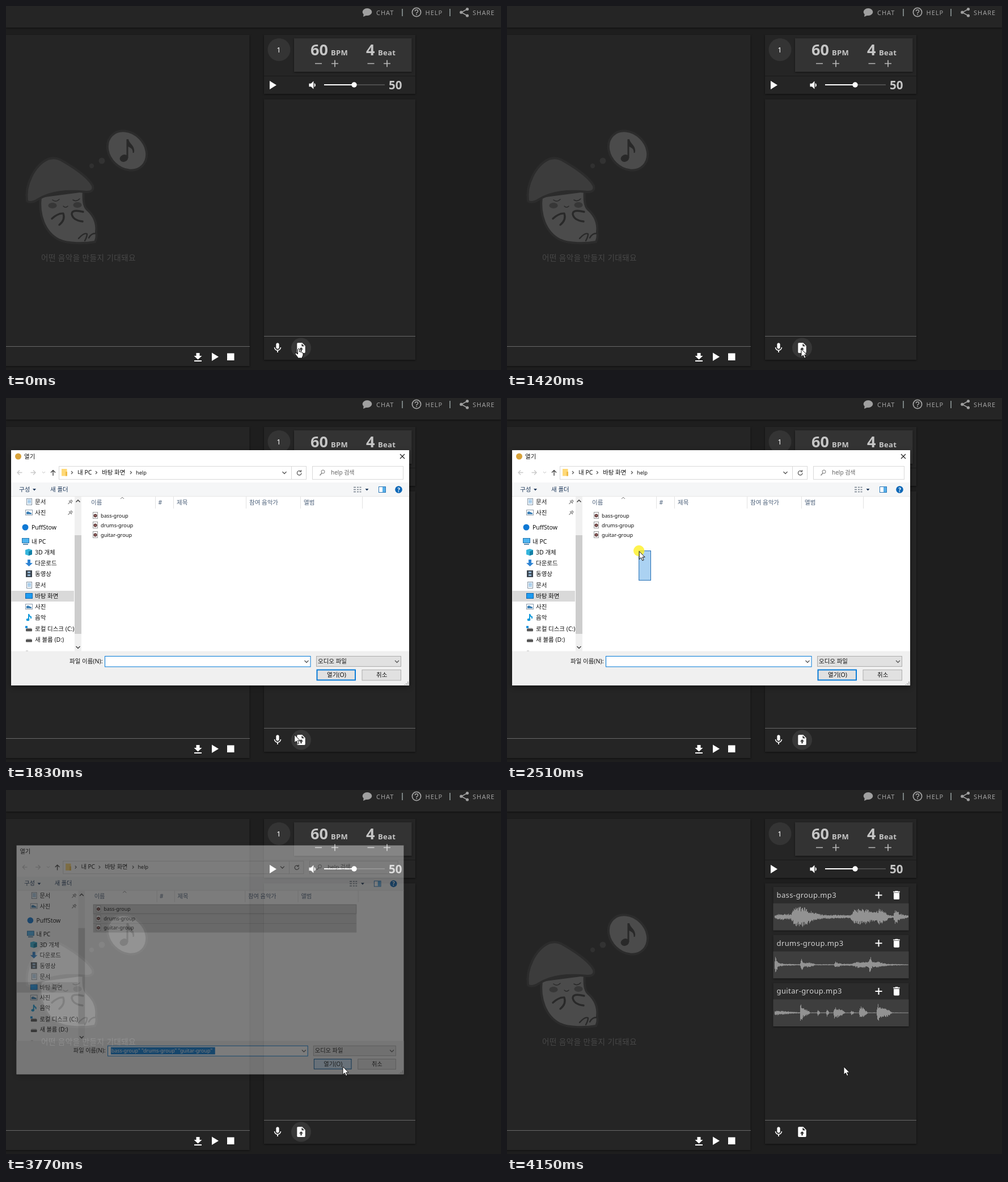
These frames come from a looping animation (873x642 px, 6150 ms). An HTML page:

```html
<!DOCTYPE html>
<html lang="ko">
<head>
<meta charset="utf-8">
<title>Import audio</title>
<style>
html, body { margin: 0; width: 100%; height: 100%; overflow: hidden; background: #1e1e1e; }
svg { display: block; width: 873px; height: 642px; }
text { font-family: "Noto Sans", "Noto Sans CJK KR", "Noto Sans CJK", sans-serif; white-space: pre; }
.panel { filter: drop-shadow(0 1px 1.5px rgba(0,0,0,.55)); }
.win { filter: drop-shadow(0 3px 5px rgba(0,0,0,.4)); }
</style>
</head>
<body>
<svg id="stage" viewBox="0 0 873 642"></svg>
<script>
const LOOP = 6150;
const rect = (x, y, w, h, fill, more = '') =>
  `<rect x="${x}" y="${y}" width="${w}" height="${h}" fill="${fill}" ${more}/>`;
const frame = (x, y, w, h, fill, edge, more = '') =>
  rect(x + .5, y + .5, w - 1, h - 1, fill, `stroke="${edge}" ${more}`);
const text = (x, y, size, str, fill, more = '') =>
  `<text x="${x}" y="${y}" font-size="${size}" fill="${fill}" ${more}>${str}</text>`;
const path = (d, fill, more = '') => `<path d="${d}" fill="${fill}" ${more}/>`;
const line = (d, color, w = 1, more = '') =>
  path(d, 'none', `stroke="${color}" stroke-width="${w}" ${more}`);
const dot = (x, y, r, fill, more = '') => `<circle cx="${x}" cy="${y}" r="${r}" fill="${fill}" ${more}/>`;
const oval = (x, y, rx, ry, fill, more = '') =>
  `<ellipse cx="${x}" cy="${y}" rx="${rx}" ry="${ry}" fill="${fill}" ${more}/>`;
const group = (body, more = '') => `<g ${more}>${body}</g>`;
const icon = (cx, cy, s, d, fill = '#fff') =>
  path(d, fill, `transform="translate(${cx - 12 * s} ${cy - 12 * s}) scale(${s})"`);
const plus = (x, y, r, color, w) => line(`M${x - r} ${y}h${2 * r}M${x} ${y - r}v${2 * r}`, color, w);
const ROUND = 'stroke-linecap="round" stroke-linejoin="round"';

// ---- application page ----

function mascot() {
  const dark = '#292929', edge = `stroke="#2c2c2c" stroke-width="4" ${ROUND}`;
  const pen = (d, w = 3) => line(d, dark, w, ROUND);
  return path('M61 336C57 368 68 399 93 412C110 420 140 419 157 416Q161 408 159 399Q162 375 142 358Q135 350 137 326Z', '#4b4b4b', edge)
    + path('M37 344C33 315 50 281 74 270Q87 265 101 274C125 288 145 302 153 317Q156 328 142 328C108 325 78 327 55 342Q43 349 37 344Z', '#3c3c3c', edge)
    + pen('M82 342Q88 347 94 341M118 342Q124 346 130 340M101 353Q105 357 109 353', 1.6)
    + oval(82, 352, 7.5, 5, '#373737') + oval(126, 351, 7.5, 5, '#373737')
    + pen('M81 375Q92 365 101 366Q105 377 94 386M136 363Q116 358 116 367Q118 378 135 380', 3.4)
    + pen('M128 410Q138 399 143 402Q143 407 139 414M146 409Q150 401 158 401', 2.4)
    + dot(151, 282, 4.2, '#303030') + dot(169, 273, 5.5, '#323232')
    + oval(213.5, 255, 38, 31, '#4b4b4b', `transform="rotate(45 213.5 255)" ${edge}`)
    + oval(208, 268.5, 7.5, 6.2, dark, 'transform="rotate(-20 208 268.5)"')
    + path('M212.5 268V235H216C217 243 229 247 225.5 259H223.5C224 251 219 250 215.5 248V268Z', dark)
    + text(62, 449, 13.5, '어떤 음악을 만들지 기대돼요', '#484848', 'letter-spacing=".5" font-weight="300"');
}

function header() {
  const c = '#a0a0a0';
  const label = (x, s) => text(x, 16, 11, s, c, 'letter-spacing="1" font-weight="500"');
  return rect(0, 0, 873, 38, '#252525', 'class="panel"')
    + oval(637, 10.5, 8.3, 6.5, c) + path('M631 13l-1 6 7-3z', c) + label(653, 'CHAT')
    + line('M699 5v13M783 5v13', '#8f9a9a', 1.6)
    + dot(724, 11, 7.6, 'none', `stroke="${c}" stroke-width="1.8"`)
    + line('M721.3 9.3Q721.5 6.8 724 6.8T726.6 9.3Q726.6 10.5 724 12.2V13', c, 1.6)
    + rect(723.2, 14, 1.7, 1.7, c) + label(739.5, 'HELP')
    + line('M813.5 5.5L803 11.2L813.5 17', c, 1.6)
    + dot(813.5, 5.5, 2.6, c) + dot(802.8, 11.2, 2.6, c) + dot(813.5, 17, 2.6, c) + label(823, 'SHARE');
}

const MIC = 'M12 14c1.7 0 3-1.3 3-3V5c0-1.7-1.3-3-3-3S9 3.3 9 5v6c0 1.7 1.3 3 3 3zM17.3 11c0 3-2.5 5.1-5.3 5.1S6.7 14 6.7 11H5c0 3.4 2.7 6.2 6 6.7V21h2v-3.3c3.3-.5 6-3.3 6-6.7z';
const UPLOAD = 'M14 2H6C4.9 2 4 2.9 4 4v16c0 1.1.9 2 2 2h12c1.1 0 2-.9 2-2V8zM13 9V3.5L18.5 9zM12 11l4 4h-2.7v4h-2.6v-4H8z';
const SPEAKER = 'M17 12c0-1.8-1-3.3-2.5-4v8c1.5-.7 2.5-2.2 2.5-4zM4 9v6h4l5 5V4L8 9z';
const BIN = 'M6 19c0 1.1.9 2 2 2h8c1.1 0 2-.9 2-2V7H6zM19 4h-3.5l-1-1h-5l-1 1H5v2h14z';

function page() {
  const c = '#c6c6c6', sign = '#b8b8b8';
  return rect(0, 0, 873, 642, '#1e1e1e') + header()
    + rect(-4, 51, 433.5, 584, '#252525', 'class="panel"') + mascot()
    + line('M0 600.5H430M455 582.5H722', '#686868')
    + path('M335.5 612h6v5h4l-7 6.5-7-6.5h4zM332 625h13v2h-13z', '#fff')
    + path('M363 611.5V626L375 618.8z', '#fff') + rect(390, 612.5, 12.5, 12.5, '#fff')
    + rect(455, 51, 267, 104, '#252525', 'class="panel"')
    + line('M455 123.5H722', '#1c1c1c', 1.5)
    + dot(481.5, 77, 20, '#343434') + text(477.3, 82, 13, '1', '#fff')
    + rect(508, 57, 207.5, 59, '#333', 'class="panel"')
    + text(537, 86.5, 27, '60', c, 'font-weight="700"') + text(573, 86.5, 13, 'BPM', c, 'font-weight="600" letter-spacing=".3"')
    + text(635, 86.5, 27, '4', c, 'font-weight="700"') + text(656, 86.5, 13, 'Beat', c, 'font-weight="600" letter-spacing=".3"')
    + line('M545 101.5h12M637.5 101.5h12', sign, 1.7) + plus(580, 101.5, 6, sign, 1.7) + plus(672, 101.5, 6, sign, 1.7)
    + path('M465 132V147L477 139.5z', '#fff') + icon(541.5, 139.5, .88, SPEAKER)
    + line('M614 139H668', '#5a5a5a', 1.6) + line('M561 139H614', '#fff', 2) + dot(614, 139, 4.7, '#fff')
    + text(675, 146.5, 20.5, '50', c, 'font-weight="700"')
    + rect(455, 164.5, 267, 459.5, '#252525', 'class="panel"')
    + line('M455 582.5H722', '#686868')
    + dot(520.5, 603, 17.5, '#373737', 'id="hover"') + dot(520.5, 603, 17.5, '#fff', 'id="ripple"')
    + icon(479, 603, .88, MIC) + icon(520.5, 603, .9, UPLOAD);
}

// ---- audio cards ----

const envelopes = [
  [0,3, 14,6, 30,5, 38,18, 55,18, 68,9, 85,4, 135,3, 142,13, 160,15, 179,8, 185,14, 195,12, 203,3, 211,2, 214,16, 222,6, 238,2],
  [0,2, 3,17, 8,4, 18,2, 46,1, 49,11, 55,3, 61,5, 75,1, 106,1, 109,6, 120,2, 138,2, 148,6, 167,5, 170,17, 174,5, 183,6, 200,2, 238,.6],
  [0,5, 30,2, 46,1, 47,18, 52,9, 62,4, 64,.7, 76,.7, 78,6, 82,.7, 92,.7, 94,7, 98,.7, 105,.7, 107,11, 121,5, 126,.7, 135,.7, 137,5, 142,.7, 150,.7, 153,13, 164,3, 166,.7, 181,.7, 183,17, 192,8, 200,8, 209,.7, 238,.5]
];

function amp(env, x) {
  let i = 0;
  while (i < env.length - 4 && x > env[i + 2]) i += 2;
  const [x0, a0, x1, a1] = env.slice(i, i + 4);
  return a0 + (a1 - a0) * (x - x0) / (x1 - x0);
}

function wave(env, cy, seed) {
  const noise = () => .5 + .5 * ((seed = seed * 16807 % 2147483647) / 2147483647);
  let d = '';
  for (let x = 2; x < 238; x++) {
    const a = amp(env, x), up = Math.max(.5, a * noise()), down = Math.max(.5, a * noise());
    d += `M${470.5 + x} ${(cy - up).toFixed(1)}v${(up + down).toFixed(1)}`;
  }
  return line(d, '#929292', 1.05);
}

const cards = ['bass', 'drums', 'guitar'].map((name, i) => {
  const y = 171 + i * 84.7;
  return group(rect(469.5, y, 239, 76.5, '#2c2c2c', 'class="panel"')
    + rect(469.5, y + 29, 239, 47.5, '#3e3e3e')
    + text(475.5, y + 19, 13, name + '-group.mp3', '#d2d2d2', 'letter-spacing=".4"')
    + plus(655.5, y + 14.5, 6, '#fff', 2) + icon(687, y + 14.5, .84, BIN)
    + group(wave(envelopes[i], y + 52.5, 77 + i * 31), `id="wave${i}"`), `id="card${i}"`);
}).join('');

// ---- file dialog ----

const art = {
  doc: (x, y) => frame(x + 2, y - 6, 10, 12, '#fff', '#8293a3') + line(`M${x + 4} ${y - 3}h6M${x + 4} ${y - .5}h6M${x + 4} ${y + 2}h6`, '#3f8fd0'),
  pic: (x, y) => frame(x, y - 5, 13, 10, '#fff', '#8a99a8') + path(`M${x + 2} ${y + 3}v-4l3-1 6 3v2z`, '#3b7fb5'),
  ball: (x, y) => dot(x + 6, y, 5.5, '#0f78d4'),
  pc: (x, y) => frame(x, y - 6, 13, 9, '#4db4f0', '#2374ad') + rect(x + 2, y + 4, 9, 2, '#5d8cb0'),
  cube: (x, y) => path(`M${x} ${y - 4}l6-2 6 2v8l-6 2-6-2z`, '#35b5dc') + path(`M${x + 6} ${y - 1}l6-3v8l-6 2z`, '#137fa5'),
  down: (x, y) => path(`M${x + 4} ${y - 6}h5v6h4l-6.500 6-6.500-6h4z`, '#2d83d2'),
  film: (x, y) => rect(x + 1, y - 6, 11, 12, '#3c4650') + rect(x + 4, y - 4, 5, 3, '#8fb3d0') + rect(x + 4, y + 1, 5, 3, '#8fb3d0'),
  desk: (x, y) => frame(x, y - 5, 13, 10, '#1e9bf0', '#0e65ad'),
  note: (x, y) => line(`M${x + 6} ${y + 4}v-10q1 4 4 5v3`, '#129bdc', 2) + oval(x + 4.500, y + 4, 2.800, 2.200, '#129bdc'),
  disk: (x, y) => rect(x + 1, y, 11, 4.5, '#555', 'rx="1"') + rect(x + 2, y - 1.5, 9, 1.5, '#b8b8b8'),
  sys: (x, y) => art.disk(x, y) + rect(x, y - 5, 4, 4, '#1e93dc')
};

const places = [
  [183, '문서', 'doc'], [202, '사진', 'pic'], [228, 'PuffStow', 'ball', 1], [253, '내 PC', 'pc', 1],
  [272, '3D 개체', 'cube'], [291, '다운로드', 'down'], [310, '동영상', 'film'], [330, '문서', 'doc'],
  [349, '바탕 화면', 'desk'], [368, '사진', 'pic'], [387, '음악', 'note'],
  [407, '로컬 디스크 (C:)', 'sys'], [426, '새 볼륨 (D:)', 'disk']
];

const ko = (x, y, s, fill = '#111') => text(x, y, 10.5, s, fill);
const en = (x, y, s, more = '') => text(x, y, 9.2, s, '#111', more);
const chevron = (x, y, c = '#555') => line(`M${x - 3.5} ${y - 2}l3.5 3.500 3.5-3.500`, c, 1.3);

function sidebar() {
  const pin = y => line(`M109.500 ${y + 4}l3.500-3.500M111 ${y - 2}l5 5M113 ${y - 1}l2-2 2 2-2 2`, '#8b8b8b', 1.3);
  return rect(9.5, 340, 110.5, 19, '#d9d9d9')
    + places.map(([y, s, kind, root]) => art[kind](root ? 28 : 34, y) + ko(root ? 45 : 51, y + 4, s)).join('')
    + pin(183) + pin(202) + rect(121, 174, 12, 273, '#f0f0f0') + rect(121, 242, 12, 174, '#cdcdcd')
    + line('M123.500 183.500l3.500-3.500 3.500 3.500M123.500 438l3.500 3.500 3.500-3.500', '#444', 1.5)
    + rect(35, 445.500, 4, 1, '#bbb');
}

function toolbar() {
  const nav = '#1e395b', sep = '#e2e2e2', arrow = x => line(`M${x} 129l2.500 2.500-2.500 2.500`, '#555', 1.2);
  return line('M28.500 131.500h-8.500m4-4l-4 4 4 4M43.500 131.500h8.500m-4-4l4 4-4 4', '#c9c9c9', 1.3)
    + line('M64 130l2.500 2.500 2.500-2.500', '#c0c0c0')
    + line('M83 137v-9.500m-4 4l4-4 4 4', '#444', 1.4)
    + frame(93, 120, 411, 24, '#fff', '#d9d9d9') + frame(503, 120, 27, 24, '#fff', '#d9d9d9')
    + frame(540, 120, 161, 24, '#fff', '#d9d9d9')
    + rect(98, 125, 9.500, 12.500, '#ffd977') + rect(105, 130, 3, 7.500, '#eebb48')
    + arrow(115) + ko(126, 135, '내 PC') + arrow(158) + ko(169, 135, '바탕 화면') + arrow(219) + en(229, 135, 'help')
    + chevron(491, 132)
    + line('M519.500 129.200a3.800 3.800 0 1 0 1.500 3M520.500 127v3h-3', '#555', 1.2)
    + dot(559, 130, 3, 'none', 'stroke="#777"') + line('M557 132.500l-3.500 4', '#777', 1.2)
    + text(573, 135, 10, 'help 검색', '#666')
    + rect(9.5, 149, 701, 25, '#f5f6f7') + line('M9 173.500H711', '#e8e8e8')
    + ko(23, 164.500, '구성', nav) + path('M47 160h6l-3 3.500z', nav) + ko(78, 164.500, '새 폴더', nav)
    + line('M613 157.500h4m2 0h3m1.500 0h3M613 161.500h4m2 0h3m1.500 0h3M613 165.500h4m2 0h3m1.500 0h3', '#75808c', 1.6)
    + path('M633.500 160h6l-3 3.500z', nav)
    + frame(657, 156, 13, 11, '#fff', '#2b77b8') + rect(664, 157, 5, 9, '#57aee8')
    + dot(692.500, 161.500, 6.300, '#0b67b7') + text(690.200, 165.500, 10, '?', '#fff', 'font-weight="700"')
    + rect(136, 174, 127, 20, '#d9ebf9', 'id="colhot"')
    + line('M263.500 174v21M295.500 174v21M423.500 174v21M519.500 174v21M628.500 174v21', sep)
    + line('M202 178l3-3 3 3', '#777')
    + [[150, '이름'], [268.500, '#'], [301, '제목'], [429, '참여 음악가'], [525, '앨범']].map(([x, s]) => ko(x, 187.500, s, '#4c607a')).join('');
}

const files = ['bass-group', 'drums-group', 'guitar-group'].map((s, i) => {
  const y = 199 + i * 17;
  return rect(148, y, 477.500, 17, '#cce8ff', `id="row${i}"`)
    + (i ? line(`M148 ${y + .5}h477`, '#a9d5f7', 1, `id="edge${i}"`) : frame(148, y, 477.500, 17, 'none', '#99d1ff', 'id="edge0"'))
    + frame(153, y + 2, 9, 12, '#fff', '#9a9a9a') + dot(157.500, y + 8.500, 3, '#5a3434') + dot(157.500, y + 8.500, 1, '#e9a9a0')
    + en(167, y + 11.700, s);
}).join('');

const dialog = rect(9, 92, 702, 415, '#fff', 'class="win"')
  + rect(9, 446.500, 702, 60.500, '#f0f0f0')
  + group(dot(21.500, 103, 5.500, '#d8a23a') + line('M695 99l8 8m0-8l-8 8', '#222', 1.2), 'id="active"')
  + text(32, 107, 10.500, '열기', '#111', 'id="caption"')
  + group(rect(113, 458.500, 57, 12, '#fafafa') + rect(175, 455, 363, 18.500, '#fafafa') + rect(547, 455, 150, 18.500, '#fafafa')
    + rect(547, 479, 70, 19.500, '#fafafa') + rect(627, 479, 70, 19.500, '#fafafa') + rect(697, 494, 14, 13, '#fafafa'), 'id="blank"')
  + group(toolbar() + sidebar() + files
    + ko(112, 468, '파일 이름(N):') + frame(174, 455, 363.500, 19.500, '#fff', '#0078d7', 'id="field"')
    + rect(180, 458, 189, 13, '#0078d7', 'id="mark"')
    + en(177, 468, '"bass-group" "drums-group" "guitar-group"', 'id="names"') + chevron(530, 465)
    + frame(547, 455, 150, 19, '#e1e1e1', '#adadad') + ko(550, 468, '오디오 파일') + chevron(689.500, 465)
    + rect(548.500, 479.500, 67.500, 18, '#e1e1e1', 'id="open"') + ko(566, 492, '열기(O)')
    + frame(627.500, 479, 69.500, 19.500, '#e1e1e1', '#adadad') + ko(653, 492, '취소')
    + line('M709 500v6M706 503v3M703 505v1', '#aaa', 1.500)
    + frame(0, 0, 2, 2, '#0078d7', '#256fb5', 'fill-opacity=".33" id="band"'), 'id="full"');

const pointer = dot(-.5, -1, 9.7, '#fff01e', 'id="press" opacity=".78"')
  + path('M0 0V14L3.300 11 5.700 16.300 8 15.200 5.700 10.200H10z', '#fff', 'id="arrow" stroke="#111" stroke-width="1"')
  + path('M-1.500 1.500Q0 -1 1.500 1.500V6Q3 5 4 6.500Q5.500 5.700 6 7.300Q8 6.800 8 9V11Q8 13.500 6.500 15V17H-1.500V15.500Q-4 12.500-6 9.500Q-6 7.500-4 8.200L-1.500 10Z', '#fff', 'id="hand" stroke="#111"');

const stage = document.getElementById('stage');
stage.innerHTML = page() + cards + group(dialog, 'id="dialog"') + group(pointer, 'id="pointer"');
const el = {};
stage.querySelectorAll('[id]').forEach(e => el[e.id] = e);

// ---- motion ----

// time, x, y, eased
const trail = [
  [20, 516, 604, 0], [160, 521, 606, 0], [1390, 521, 606, 0], [1391, 519, 605, 0], [1780, 519, 605, 0],
  [2210, 254, 322, 1], [2240, 254, 322, 0], [2510, 233.500, 271, 0], [2690, 180, 181, 0],
  [2890, 180, 181, 0], [3400, 594, 488, 1]
];
const clamp = v => Math.max(0, Math.min(1, v));
const part = (t, a, b) => clamp((t - a) / (b - a));
const within = (t, a, b) => t >= a && t < b;
const show = (id, on) => el[id].setAttribute('display', on ? 'inline' : 'none');
const set = (id, attrs) => { for (const k in attrs) el[id].setAttribute(k, attrs[k]); };

function cursorAt(t) {
  let a = trail[0];
  for (const b of trail) {
    if (t < b[0]) {
      let p = part(t, a[0], b[0]);
      if (b[3]) p = p * p * (3 - 2 * p);
      return [a[1] + (b[1] - a[1]) * p, a[2] + (b[2] - a[2]) * p];
    }
    a = b;
  }
  return [a[1], a[2]];
}

function drawDialog(t, x, y) {
  const on = within(t, 1600, 3830);
  show('dialog', on);
  if (!on) return;
  const grow = 1 - (1 - part(t, 1600, 1750)) ** 3, leave = part(t, 3700, 3830);
  const s = .95 + .05 * grow - .05 * leave;
  set('dialog', {
    opacity: clamp(grow - 1.1 * leave),
    transform: `translate(360 299.5) scale(${s}) translate(-360 -299.5)`
  });
  const loaded = t >= 1760, active = t < 3690, named = t >= 2690;
  show('blank', !loaded);
  show('full', loaded);
  show('active', active);
  set('caption', { x: active ? 32 : 15 });

  const top = cursorAt(Math.min(t, 2690))[1];
  for (let i = 0; i < 3; i++) {
    const picked = t >= 2240 && top < 214 + 17 * i;
    show('row' + i, picked);
    show('edge' + i, picked);
    set('row' + i, { fill: active ? '#cce8ff' : '#d0d0d0' });
    set('edge' + i, { stroke: active ? (i ? '#a9d5f7' : '#99d1ff') : '#b0b0b0' });
  }
  show('band', within(t, 2245, 2690));
  const by = Math.max(195.5, y - 1);
  set('band', { x: x - .5, y: by, width: Math.max(0, 254 - x), height: Math.max(0, 321.5 - by) });
  show('colhot', within(t, 2890, 3000) && y < 195);
  show('names', named);
  show('mark', !active);
  set('names', { fill: active ? '#111' : '#fff' });
  set('field', { stroke: named && active ? '#7a7a7a' : '#0078d7' });

  const hot = t > 2890 && x > 548 && y > 479, down = t >= 3520;
  set('open', {
    fill: down ? '#cce4f7' : hot ? '#e5f1fb' : '#e1e1e1',
    stroke: down ? '#005499' : '#0078d7',
    'stroke-width': hot ? 1.1 : 1.9
  });
}

function draw(t) {
  const [x, y] = cursorAt(t);
  set('pointer', { transform: `translate(${x} ${y})` });
  show('hand', t < 1390);
  show('arrow', t >= 1390);
  show('press', within(t, 750, 1390) || within(t, 2240, 2690) || within(t, 3520, 3620));
  set('hover', { opacity: 1 - part(t, 3850, 4000) });
  show('ripple', within(t, 750, 1360));
  set('ripple', { r: 4 + 13.5 * (1 - (1 - part(t, 750, 1100)) ** 2), opacity: .16 * (1 - part(t, 1050, 1360)) });
  for (let i = 0; i < 3; i++) {
    show('card' + i, t >= 3920 + 30 * i);
    show('wave' + i, t >= [4030, 4100, 4150][i]);
  }
  drawDialog(t, x, y);
}

const start = performance.now();
function tick() {
  draw((performance.now() - start) % LOOP);
  requestAnimationFrame(tick);
}
tick();
</script>
</body>
</html>
```
